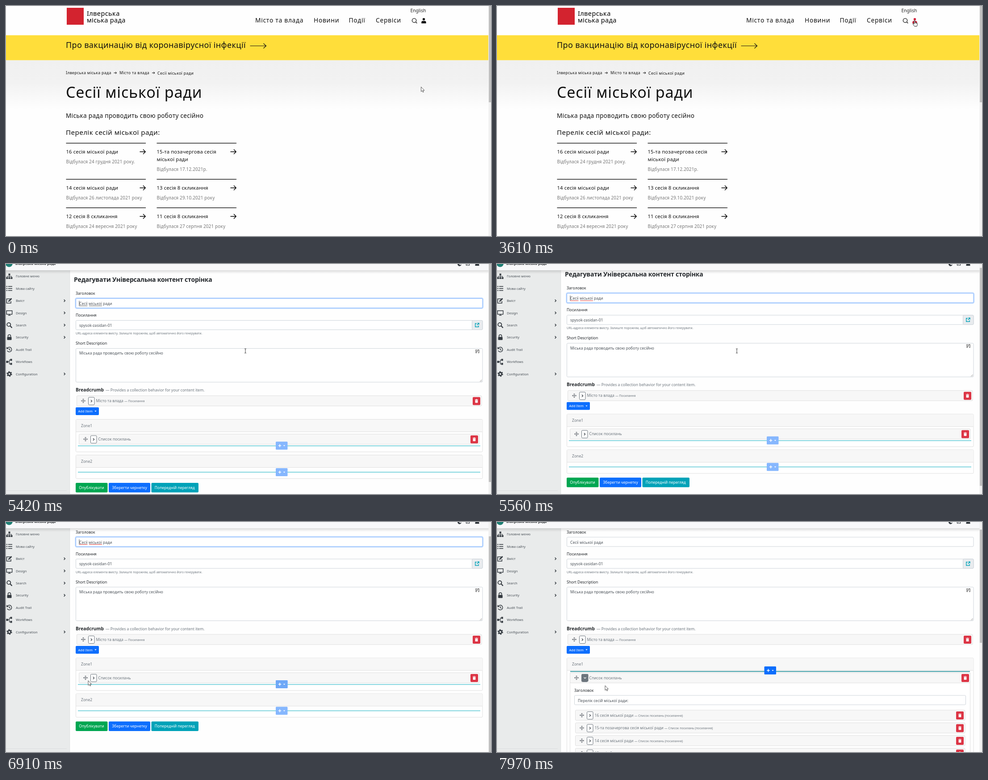
Animation, 1086 px wide and 516 px high, one loop 8 s. Source, as an HTML page:

```html
<!DOCTYPE html>
<html lang="uk">
<head>
<meta charset="utf-8">
<title>Редагування сторінки</title>
<style>
html, body { margin: 0; width: 100%; height: 100%; overflow: hidden; background: #fff; }
svg { display: block; width: 1086px; height: 516px; font-family: "Noto Sans", "Open Sans", sans-serif; }
</style>
</head>
<body>
<svg id="stage" viewBox="0 0 1086 516"></svg>
<script>
const CITY = 'Ілверська', COUNCIL = CITY + ' міська рада';
const TITLE = 'Сесії міської ради', INTRO = 'Міська рада проводить свою роботу сесійно';
const LIST = 'Перелік сесій міської ради:';

// Markup helpers
const text = (x, y, s, size = 8.6, fill = '#212529', more = '') =>
  `<text x="${x}" y="${y}" font-size="${size}" fill="${fill}" ${more}>${s}</text>`;
const spaced = n => `letter-spacing="${n}"`;
const weight = n => ` font-weight="${n}"`;
const rect = (x, y, w, h, fill, more = '') =>
  `<rect x="${x}" y="${y}" width="${w}" height="${h}" fill="${fill}" ${more}/>`;
const path = (d, stroke, width = 1) => `<path d="${d}" fill="none" stroke="${stroke}" stroke-width="${width}"/>`;
const group = (id, body) => `<g id="${id}">${body}</g>`;
const at = (x, y, body) => `<g transform="translate(${x} ${y})">${body}</g>`;
const box = (x, y, w, h, fill = '#fff', stroke = '#ced4da', r = 2) =>
  rect(x, y, w, h, fill, `stroke="${stroke}" stroke-width="1" rx="${r}"`);

// Public site
const userIcon = fill => `<g fill="${fill}"><circle cx="935.5" cy="29.6" r="2.7"/>
  <path d="M930.2 39v-2.2q0-3.4 3-3.4h4.4q3 0 3 3.4v2.2z"/></g>`;

function sessionCard(x, y, lines, date) {
  const last = y + 24 + (lines.length - 1) * 17;
  return rect(x, y, 178.5, 1.3, '#000') +
    lines.map((s, i) => text(x, y + 24 + i * 17, s, 11.2, '#111', spaced(.17))).join('') +
    text(x, last + 22, date, 10, '#777', spaced(.14)) +
    path(`M${x + 165} ${y + 20}h12.5m-5-5.2l5.2 5.2l-5.2 5.2`, '#000', 1.4);
}

function site() {
  const nav = [[558, 'Місто та влада'], [689, 'Новини'], [767.5, 'Події'], [828, 'Сервіси']];
  const crumbArrow = x => path(`M${x} 150h6m-2.4-2.3l2.4 2.3l-2.4 2.3`, '#000');
  return rect(0, 0, 1086, 516, '#fefefe') +
    rect(0, 122, 1080, 110, 'url(#fade)') +
    rect(0, 65.6, 1080, 56, '#ffde3a') +
    rect(136, 4, 38, 38, '#d3232f') +
    text(181, 22, CITY, 14.5, '#000', spaced(.4) + weight(500)) +
    text(181, 37, 'міська рада', 14.5, '#000', spaced(.3) + weight(500)) +
    nav.map(([x, s]) => text(x, 37, s, 13.8, '#111', spaced(.7))).join('') +
    text(905.5, 14, 'English', 10, '#222', spaced(.15)) +
    '<circle cx="914" cy="32.4" r="4.6" fill="none" stroke="#111" stroke-width="1.3"/>' +
    path('M917.3 35.8l3 3', '#111', 1.4) +
    group('userOff', userIcon('#111')) + group('userOn', userIcon('#d0233c')) +
    text(134, 94, 'Про вакцинацію від коронавірусної інфекції', 18, '#111', spaced(.34)) +
    path('M546.5 89.5h36m-6-5.5l6 5.5l-6 5.5', '#111', 1.2) +
    text(134, 153, COUNCIL, 8.8, '#111', spaced(.3)) + crumbArrow(241.5) +
    text(254, 153, 'Місто та влада', 8.8, '#111', spaced(.3)) + crumbArrow(327) +
    text(339, 153.5, TITLE, 8.8, '#111', spaced(.33)) +
    text(134, 206, TITLE, 34, '#111', spaced(.8) + weight(300)) +
    text(134, 251, INTRO, 13.6, '#111', spaced(.28)) +
    text(134, 288.5, LIST, 15.2, '#111', spaced(.4)) +
    sessionCard(134.5, 307, ['16 сесія міської ради'], 'Відбулася 24 грудня 2021 року.') +
    sessionCard(337.5, 307, ['15-та позачергова сесія', 'міської ради'], 'Відбулася 17.12.2021р.') +
    sessionCard(134.5, 388, ['14 сесія міської ради'], 'Відбулася 26 листопада 2021 року') +
    sessionCard(337.5, 388, ['13 сесія 8 скликання'], 'Відбулася 29.10.2021 року') +
    sessionCard(134.5, 452, ['12 сесія 8 скликання'], 'Відбулася 24 вересня 2021 року') +
    sessionCard(337.5, 452, ['11 сесія 8 скликання'], 'Відбулася 27 серпня 2021 року');
}

// Admin parts
const GRAY = '#6c757d', BLUE = '#0d6efd', RED = '#dc3545', TEAL = '#63cbd6', INK = '#343a40';
const chevron = (x, y, c, w = 1.3) => path(`M${x - 1.3} ${y - 2.6}l2.6 2.6l-2.6 2.6`, c, w);
const caret = (x, y) => `<path d="M${x - 2.2} ${y - 1}h4.4l-2.2 2.4z" fill="#fff"/>`;
const moveIcon = (x, y) => path(`M${x - 4} ${y}h8M${x} ${y - 4}v8
  M${x - 1.6} ${y - 3}l1.6-1.6l1.6 1.6M${x - 1.6} ${y + 3}l1.6 1.6l1.6-1.6
  M${x - 3} ${y - 1.6}l-1.6 1.6l1.6 1.6M${x + 3} ${y - 1.6}l1.6 1.6l-1.6 1.6`, '#5a6068');
const trash = (x, y) => rect(x, y, 17, 18, RED, 'rx="2"') +
  path(`M${x + 5} ${y + 6}h7m-4.6-1h2.2`, '#fff') + rect(x + 5.6, y + 7, 5.8, 6, '#fff', 'rx=".7"');
const label = (x, y, name, note) =>
  text(x, y, `${name}${note ? ` <tspan font-size="6.8">— ${note}</tspan>` : ''}`, 8.6, GRAY);
const darkToggle = (x, c) => rect(x, c - 8.5, 15, 17, GRAY, 'rx="2"');

function itemCard(x, y, right, name, note) {
  const icon = x + 14.5, c = y + 11.5;
  return box(x, y, right - x, 23, '#f7f7f7', '#dfdfdf') + moveIcon(icon, c) +
    box(icon + 11.5, c - 8, 13.5, 17, '#fff', GRAY) + chevron(icon + 18.2, c + .5, INK) +
    label(icon + 28.5, c + 3, name, note) + trash(right - 20, c - 8.5);
}

const bareCard = (x, y, right, name, note) =>
  box(x, y, right - x, 19, '#f7f7f7', '#dfdfdf') +
  box(x + 17, y + 8, 9.5, 5, '#fff', '#777', 1.5) +
  label(x + 29.5, y + 12.8, name, note) + rect(right - 13, y + 2.5, 10.5, 6, '#d9483f', 'rx="1.5"');

const zoneBox = (y, h, name) => box(156.5, y, 910.5, h, '#fff', '#dfdfdf') +
  rect(157, y + .5, 909.5, 27.5, '#f7f7f7') + rect(157, y + 27.5, 909.5, 1, '#dfdfdf') +
  text(168, y + 17.3, name, 8.6, GRAY);

const plus = (x, y) => path(`M${x - 3.2} ${y}h6.4M${x} ${y - 3.2}v6.4`, '#fff', 1.5);
const addButton = (x, y, fill) => rect(x, y, 26.5, 18, fill, 'rx="1.5"') + plus(x + 9, y + 9) + caret(x + 19, y + 9);
const addLine = y => rect(161, y - .8, 901, 1.6, TEAL);
const button = (x, w, fill, s) => rect(x, 491, w, 21.5, fill, 'rx="2"') + text(x + 7.3, 504.8, s, 8.5, '#fff');
const addItem = y => rect(156, y, 52, 17.5, BLUE, 'rx="2"') +
  text(161.5, y + 11.6, 'Add Item', 7.55, '#fff') + caret(200.5, y + 8.6);

const titleText = () => text(164, 92, TITLE, 8.6, '#495057');

function fields(split) {
  return text(152, 39.8, 'Редагувати Універсальна контент сторінка', 14, '#212529', spaced(-.2) + weight(700)) +
    text(156, 69, 'Заголовок') + box(156.5, 77.5, 910.5, 21) + titleText() +
    text(156, 118, 'Посилання') + box(156.5, 126.5, 910.5, 21) +
    box(split, 126.5, 1067 - split, 21, '#e9ecef') +
    text(164, 140.8, 'spysok-zasidan-01', 8.6, '#495057') +
    text(156, 158, 'URL-адреса елемента вмісту. Залиште порожнім, щоб автоматично його генерувати.', 6.8, GRAY) +
    text(156, 181, 'Short Description') + box(156.5, 189.5, 910.5, 75.5) +
    text(164, 203.3, INTRO, 8.6, '#495057') +
    path('M1061 264l4.5-4.5M1063.5 264l2-2', '#777', .7) +
    text(156, 286, 'Breadcrumb', 10.2, '#212529', weight(600)) +
    text(223, 286, '— Provides a collection behavior for your content item.', 8.6, GRAY);
}

const loadingForm = () => fields(1052.5) + bareCard(158.5, 295.5, 1065, 'Місто та влада', 'Посилання') +
  addItem(329.5) + zoneBox(356.5, 81, 'Zone1') + bareCard(163.5, 389.5, 1059.5, 'Список посилань') +
  zoneBox(443.5, 90, 'Zone2') +
  [424, 510.5].map(y => addLine(y) + rect(604, y - 9.5, 17, 17.5, '#86b7fe', 'rx="1.5"') + caret(612.5, y - 1)).join('');

function closedZones() {
  return zoneBox(348.5, 73, 'Zone1') + itemCard(163.5, 381.5, 1060, 'Список посилань') +
    group('toggleHover', darkToggle(189.5, 393) + chevron(197, 393, '#fff')) +
    addLine(408) + addButton(604, 398.5, '#86b7fe') +
    group('zoneHover', addButton(604, 398.5, '#6ea8f7')) +
    zoneBox(428.5, 53, 'Zone2') + addLine(467) + addButton(604, 458, '#86b7fe') +
    button(156, 71.5, '#00a651', 'Опублікувати') + button(230, 93, BLUE, 'Зберегти чернетку') +
    button(325.5, 105.5, '#00a2b8', 'Попередній перегляд');
}

function openZone() {
  const rows = ['16 сесія міської ради', '15-та позачергова сесія міської ради', '14 сесія міської ради', '13 сесія 8 скликання'];
  return zoneBox(348.5, 400, 'Zone1') + box(163.5, 381.5, 896, 380, '#fff', '#dfdfdf') +
    itemCard(163.5, 381.5, 1060, 'Список посилань') + darkToggle(189.5, 393) +
    path('M194.6 392l2.4 2.4l2.4-2.4', '#fff', 1.2) +
    rect(164, 378, 895, 1.6, '#168a95') + addButton(598.5, 367.5, BLUE) +
    text(173, 424.5, 'Заголовок') + box(173.5, 432.5, 876, 21) + text(181, 447, LIST, 8.6, '#495057') +
    rows.map((s, i) => itemCard(175.5, 465.5 + i * 28.5, 1048, s, 'Список посилань (посилання)')).join('');
}

function readyForm() {
  return fields(1043.5) +
    group('focus', rect(155.5, 76.5, 912.5, 23, 'none', 'stroke="#c2dbfe" stroke-width="2.4" rx="3"') +
      box(156.5, 77.5, 910.5, 21, '#fff', '#86b7fe') + rect(163.6, 82.5, .8, 11.5, '#222') +
      titleText() + path('M164 94h18.5M186 94h29', 'currentColor')) +
    path('M1054 133.5h-3.2v7.5h7.4v-3M1054.5 137.2l4.2-4.2m-3.2-.3h3.5v3.5', '#00a2b8', 1.4) +
    text(1051.2, 198, '[/]', 8, '#222', weight(600)) +
    itemCard(158.5, 295.5, 1065, 'Місто та влада', 'Посилання') + addItem(321.5) +
    group('closed', closedZones()) + group('open', openZone());
}

// Sidebar icons, each centred on 0,0
const ring = (x, r, w, more = '') => `<circle cx="${x}" cy="${x}" r="${r}" fill="none" stroke="${INK}" stroke-width="${w}" ${more}/>`;
const ICONS = [
  rect(-2, -6, 4, 4, INK) + [-7, -2, 3].map(x => rect(x, 2, 4, 4, INK)).join('') + path('M0-2v4M-5 2v-2h10v2', INK),
  [-4.5, 0, 4.5].map(y => rect(-6.5, y - 1, 2, 2, INK) + rect(-2.8, y - .8, 9.3, 1.6, INK)).join(''),
  path('M2-4h-8v9.5h9.5v-4.5', INK, 1.5) + path('M-2 2l7-7', INK, 2.8),
  path('M-6.2-5h12.4v8h-12.4zM0 3v2.5M-3 5.7h6', INK, 1.4),
  ring(-1.2, 4, 1.8) + path('M2 2l4 4', INK, 2.2),
  rect(-5, -1, 10, 7, INK, 'rx="1.2"') + path('M-3-1v-2a3 3 0 0 1 6 0v2', INK, 1.6),
  path('M-4.8-2.5a5.3 5.3 0 1 1 0 5M-5.5-5.5v3.5h3.5M0-3v3.3l2.2 1.4', INK, 1.5),
  rect(-7, -2, 4.5, 4.5, INK) + rect(2, -6.5, 4, 4.5, INK) + rect(2, 2.5, 4, 4.5, INK) + path('M-3 0h3M2-4h-2v9h2', INK, 1.2),
  ring(0, 3.3, 2.6) + ring(0, 5.2, 2, 'stroke-dasharray="2.72"')
];
const MENU = ['Головне меню', 'Мова сайту', 'Вміст', 'Design', 'Search', 'Security', 'Audit Trail', 'Workflows', 'Configuration'];
const NESTED = [2, 3, 4, 5, 8];

function chrome() {
  const rowY = i => 27.5 + i * 27.4;
  const icons = ICONS.map((s, i) => at(7.5, rowY(i), s)).join('') +
    NESTED.map(i => chevron(131, rowY(i), INK, 1.5)).join('') +
    `<path d="M1014-4a4.5 4.5 0 1 0 6 5a4 4 0 0 1-6-5" fill="${INK}"/>` +
    path('M1030.5-3v6h7v-4M1033 1l5-5', INK, 1.2) +
    `<path d="M1050.5 4v-2q0-3 4.5-3t4.5 3v2z" fill="${INK}"/>`;
  return rect(0, 14, 143, 502, '#e9ebeb') + rect(142.5, 14, .7, 502, '#d9dcdd') + rect(0, 508, 136, .7, '#d6d9da') +
    MENU.map((s, i) => text(22, rowY(i) + 2.8, s, 7.5, '#495057')).join('') +
    rect(0, 14, 1081, 8, 'url(#shade)') + rect(0, 0, 1081, 14, '#f8f8fa') +
    '<circle cx="7" cy="-1" r="7.8" fill="#1f7f74"/>' +
    text(21, 2, COUNCIL, 7.7, '#212529', weight(700)) + group('icons', icons);
}

// Pointers, hot spot at 0,0
const ARROW = '<path d="M0 0v10.5l2.4-2.2l1.7 3.7l1.6-.7l-1.6-3.5h3.3z" fill="#fff" stroke="#222" stroke-width=".75"/>';
const HAND = `<path d="M-1 1.4q0-1.2 1-1.2t1 1.2v3.3q1.6-.5 1.9.7q1.5-.4 1.7.8q1.5-.2 1.5 1.2
  v2.8q0 1.4-1 3.3h-5.3l-2.8-3.7q-1.5-2-.4-2.5q.9-.3 2.4 1.5z" fill="#fff" stroke="#111" stroke-width=".9"/>` +
  path('M1 4.7v2.5m1.9-1.8v2m1.7-1.2v1.5', '#111', .7);
const BEAM = path('M-2-5q2 0 2 1v8q0 1 2 1M2-5q-2 0-2 1M0 4q0 1-2 1', '#222', .9);

document.getElementById('stage').innerHTML = `<defs>
  <linearGradient id="fade" x2="0" y2="1"><stop stop-color="#f0f0f0"/><stop offset=".45" stop-color="#f2f2f2"/><stop offset="1" stop-color="#fefefe"/></linearGradient>
  <linearGradient id="shade" x2="0" y2="1"><stop stop-color="#000" stop-opacity=".13"/><stop offset="1" stop-color="#000" stop-opacity="0"/></linearGradient>
  </defs>` +
  group('site', site()) +
  group('admin', rect(0, 0, 1086, 516, '#fefefe') + group('loading', loadingForm()) + group('ready', readyForm()) + chrome()) +
  rect(1080.4, 0, 5.6, 516, '#f1f1f1') + rect(1081, 0, 5, 1, '#c1c1c1', 'id="thumb"') +
  group('pointer', group('arrow', ARROW) + group('hand', HAND) + group('beam', BEAM));

const el = id => document.getElementById(id);
const show = (id, on) => el(id).setAttribute('display', on ? 'inline' : 'none');

// Pointer path: time, x, y
const TRACK = [
  [390, 929.5, 181.5], [560, 922, 145], [760, 918, 90], [960, 921, 48], [1130, 928, 28],
  [1390, 928, 28], [1450, 935, 32], [4680, 935, 32], [4800, 927, 52], [4900, 919, 74],
  [5080, 780, 135], [5260, 610, 178], [5420, 536, 195], [5480, 537, 195], [5750, 537, 195],
  [5920, 450, 235], [6150, 340, 290], [6350, 340, 290], [6520, 235, 340], [6700, 168, 367],
  [6790, 170, 366], [6910, 184, 356], [7120, 196, 348], [7500, 196, 348], [7700, 222, 362], [7940, 242, 367]
];
function pointerAt(t) {
  const i = TRACK.findIndex(k => k[0] > t);
  if (i === 0) return TRACK[0].slice(1);
  if (i < 0) return TRACK[TRACK.length - 1].slice(1);
  const [a, x, y] = TRACK[i - 1], [b, u, v] = TRACK[i], p = (t - a) / (b - a);
  return [x + (u - x) * p, y + (v - y) * p];
}

function pointerKind(t, x, y) {
  if (t < 4350) return t >= 1450 ? 'hand' : 'arrow';
  if (t >= 7060 && t < 7600) return 'hand';
  const s = y + scrollAt(t);
  const inField = x > 156 && x < 1067 && ((s > 77 && s < 99) || (s > 126 && s < 148) || (s > 189 && s < 265));
  return inField ? 'beam' : 'arrow';
}

function scrollAt(t) {
  const p = Math.min(1, Math.max(0, (t - 5540) / 145));
  return 43.5 * (1 - (1 - p) ** 2);
}

function draw(t) {
  const admin = t >= 4280, ready = t >= 4350, open = t >= 7440, scroll = scrollAt(t);
  show('site', !admin);
  show('admin', admin);
  show('userOn', t >= 1390);
  show('userOff', t < 1390);
  show('loading', !ready);
  show('ready', ready);
  show('icons', ready);
  show('focus', !open);
  show('closed', !open);
  show('open', open);
  show('toggleHover', t >= 7060);
  show('zoneHover', t >= 6480);
  el('focus').setAttribute('color', t < 5470 ? '#666' : '#e0413c');
  el('ready').setAttribute('transform', `translate(0 ${-scroll})`);

  const top = open ? 17 : scroll * .74;
  const end = !admin ? 216 : !ready ? 455 : open ? 271 : 489 + top;
  el('thumb').setAttribute('y', top);
  el('thumb').setAttribute('height', end - top);

  const [x, y] = pointerAt(t), kind = pointerKind(t, x, y);
  el('pointer').setAttribute('transform', `translate(${x} ${y})`);
  ['arrow', 'hand', 'beam'].forEach(k => show(k, k === kind));
}

const start = performance.now();
function tick() {
  draw((performance.now() - start) % 8000);
  requestAnimationFrame(tick);
}
draw(0);
requestAnimationFrame(tick);
</script>
</body>
</html>
```
